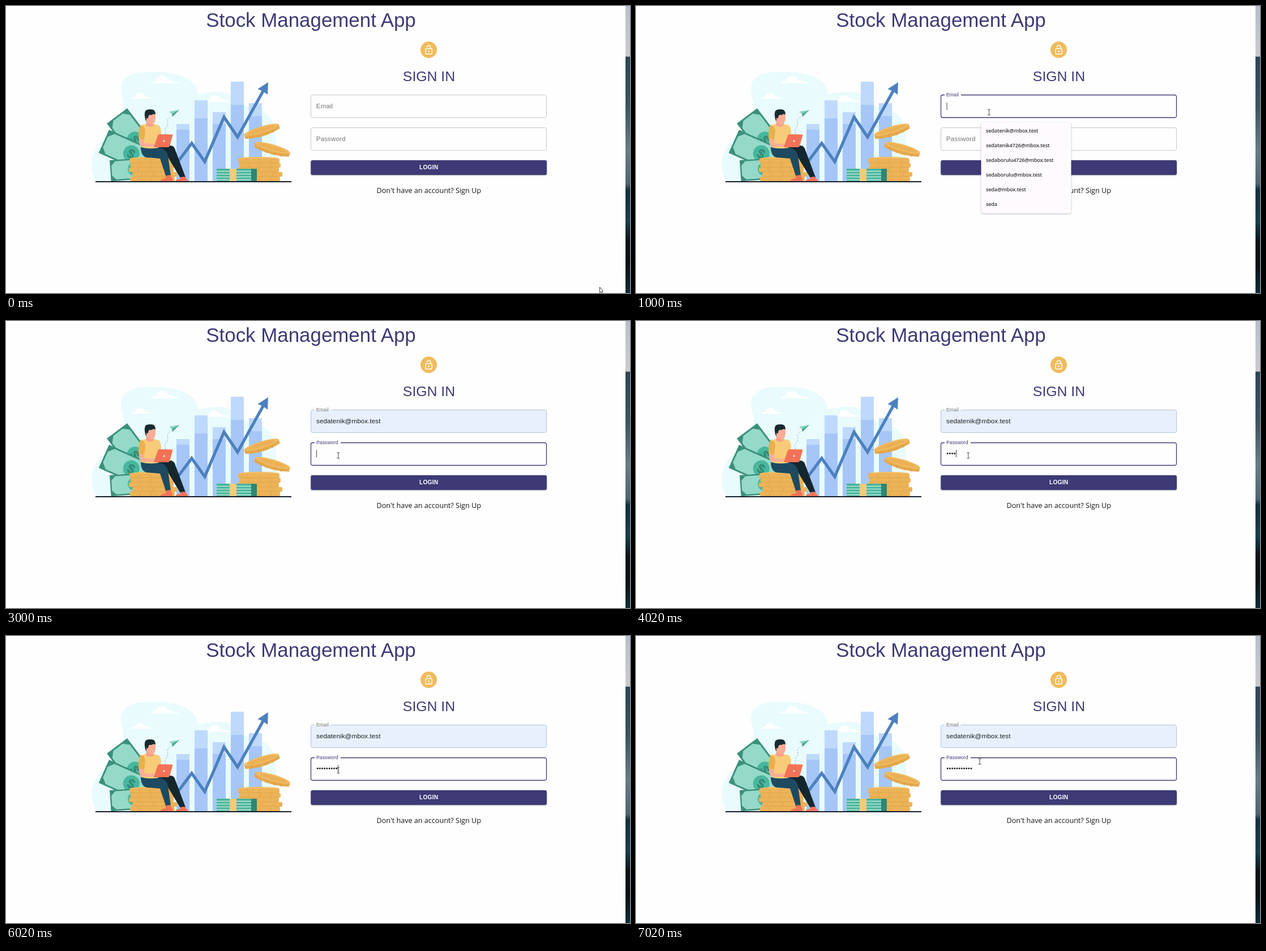
Animation, 1102 px wide and 508 px high, one loop 8000 ms. Source, as an HTML page:

```html
<!DOCTYPE html>
<html lang="en">
<head>
<meta charset="utf-8">
<title>Stock Management App</title>
<style>
html, body { margin: 0; width: 100%; height: 100%; overflow: hidden; background: #fefefe; }
svg { display: block; width: 1102px; height: 508px; font-family: "Liberation Sans", Arial, sans-serif; }
.mid { text-anchor: middle; }
.shade { filter: drop-shadow(0 1px 1px #0005); }
.float { filter: drop-shadow(0 1px 1.5px #0004); }
.value { font-size: 11.6px; letter-spacing: .1px; }
.list { font: 600 9px "Open Sans", sans-serif; letter-spacing: -.1px; fill: #333; }
</style>
</head>
<body>
<svg viewBox="0 0 1102 508">
  <defs>
    <linearGradient id="photo" x2="0" y2="1">
      <stop offset="0" stop-color="#b8bec9"/>
      <stop offset=".175" stop-color="#cbcbcd"/>
      <stop offset=".178" stop-color="#2f4657"/>
      <stop offset=".35" stop-color="#3c5361"/>
      <stop offset=".5" stop-color="#687c88"/>
      <stop offset=".62" stop-color="#4e6573"/>
      <stop offset=".64" stop-color="#13313f"/>
      <stop offset=".75" stop-color="#183f4d"/>
      <stop offset=".82" stop-color="#0a1418"/>
      <stop offset=".9" stop-color="#081115"/>
      <stop offset="1" stop-color="#102d39"/>
    </linearGradient>
    <g id="cloud" fill="#fff"><path d="M0 13q3-5 10-4q1-9 11-9q8 0 10 7q6-1 8 3q8-1 11 3z"/></g>
    <g id="bill">
      <rect width="106" height="45" fill="#3b907a"/>
      <path d="M12 3H94L103 12V33L94 42H12L3 33V12Z" fill="#95d9c8"/>
      <circle cx="53" cy="22.500" r="14.500" fill="#48b79e"/>
      <text class="mid" x="53" y="31" font-size="23" font-weight="700" fill="#318570">$</text>
    </g>
    <g id="coin">
      <path d="M-32-3V4Q0 13 32 4V-3Z" fill="#e5a94c"/>
      <ellipse cy="-3" rx="32" ry="6" fill="#f0ba60"/>
      <ellipse cy="-3" rx="25" ry="3.5" fill="#ebb056"/>
      <path d="M-20 2.500v5M-8 4v5M6 4v5M18 3v5" stroke="#d69a42"/>
    </g>
  </defs>

  <rect x="1094" width="8" height="508" fill="url(#photo)"/>
  <g fill="#3d3a76" class="mid">
    <text x="538.5" y="37" font-size="34.9">Stock Management App</text>
    <text x="747" y="132.5" font-size="24.8">SIGN IN</text>
  </g>
  <circle cx="746.5" cy="77.5" r="14.5" fill="#f1bb5c"/>
  <g fill="none" stroke="#fff" stroke-width="1.5">
    <rect x="741" y="75.5" width="11.2" height="9.4" rx="1"/>
    <path d="M743.4 73.2a3.2 3.2 0 0 1 6.4 0v2.3"/>
    <circle cx="746.6" cy="80.2" r=".8"/>
  </g>

  <path fill="#e9fbfc" d="M160 310C147 290 149 260 167 240C195 222 215 190 205 160C197 130 215 117 250 117C300 115 336 126 339 157C368 149 407 147 413 176C440 178 468 186 474 213C480 250 476 290 484 310Z"/>
  <use href="#cloud" x="255" y="124"/>
  <use href="#cloud" transform="translate(221 154)scale(.76)"/>
  <use href="#cloud" transform="translate(350 158)scale(.9)"/>
  <g id="bars"></g>
  <path d="M301 279L328 243L351 275.500L385 196.500L409 232L456 147" fill="none" stroke="#4c80bf" stroke-width="5.200"/>
  <path d="M463 135L462 157L454 151L444.500 147Z" fill="#4c80bf"/>

  <use href="#bill" transform="translate(214 181)rotate(53)"/>
  <use href="#bill" transform="translate(182 219)rotate(24)"/>
  <use href="#bill" transform="translate(183 273)rotate(-4)scale(.8 .83)"/>

  <g id="stacks"></g>
  <use href="#coin" transform="translate(452 222)rotate(-17)"/>
  <use href="#coin" transform="translate(470 254)rotate(16)"/>
  <g id="cash">
    <path d="M372 288H443V310H372Z" fill="#46b39a"/>
    <path d="M372 292.500H433M372 297.500H433M372 302.500H433M372 307.500H433" stroke="#a5e1d1" stroke-width="1.800"/>
    <path d="M395 288H407V310H395Z" fill="#f6ca7b"/>
    <path d="M433 288H443V310H433Z" fill="#318570"/>
  </g>
  <path d="M158 311H504" stroke="#151c2b" stroke-width="2"/>

  <path d="M282 227Q279 218 284 214Q287 209 285 204Q285 199 292 195" fill="none" stroke="#a5adb0" stroke-dasharray="3 2"/>
  <path d="M288 187L306 184L294 196L293 191Z" fill="#8ad5bf"/>
  <path d="M293 191L306 184L294 196Z" fill="#46a88e"/>

  <g>
    <path d="M263 250L290 247Q297 247 299 255L317 303L309 306L285 266L258 267Z" fill="#14272e"/>
    <path d="M238 250L268 250Q284 253 286 265L291 300L283 303L272 270L247 268Q238 264 238 250Z" fill="#1d4a61"/>
    <path d="M283 300L290 299L294 306V310H272Q274 306 282 305ZM308 303L315 302L321 308V310H299Q301 306 308 306Z" fill="#f37257"/>
    <path d="M237 211Q254 206 270 211Q276 219 273 229L269 251Q252 254 239 250Z" fill="#f8cb78"/>
    <path d="M248 204L260 204L261 211Q255 217 247 211Z" fill="#f4a08a"/>
    <path d="M247 189H264V200Q263 209 257 210Q249 207 247 199Z" fill="#f9ad96"/>
    <path d="M248 205Q244 197 245 190Q245 182 255 183Q264 182 264 192Q260 190 257 193Q251 191 251 199L248 198Z" fill="#172a30"/>
    <path d="M237 211Q246 211 246 222L244 237L234 235Q234 218 237 211Z" fill="#e9b04e"/>
    <path d="M235 234L244 236L244 243L263 244L265 249H240Q234 247 235 234Z" fill="#f9ad96"/>
    <path d="M268 229Q269 227 271 227L294 227.500Q295 228 294 230L289 248Q288 250 286 250H261Z" fill="#f37257"/>
    <circle cx="279" cy="239" r="1.500" fill="#fff"/>
  </g>

  <g id="live"></g>
</svg>
<script>
const NAVY = '#3d3a76';
const get = id => document.getElementById(id);
const rect = (x, y, w, h, fill, more = '') =>
  `<rect x="${x}" y="${y}" width="${w}" height="${h}" fill="${fill}" ${more}/>`;
const text = (x, y, s, more = '') => `<text x="${x}" y="${y}" ${more}>${s}</text>`;

// x, top, where the darker part begins
get('bars').innerHTML = [[301, 209, 219], [333, 167, 199], [365, 188, 209], [397, 134, 175], [429, 172, 195]]
  .map(([x, top, dark]) => rect(x, top, 23, 310 - top, '#bed9fb') + rect(x, dark, 23, 310 - dark, '#a5c6f7')).join('');

function stack(x, w) {
  let out = `<ellipse cx="${x + w / 2}" cy="270" rx="${w / 2 - 1}" ry="3" fill="#f2bd62"/>`;
  for (let i = 0; i < 5; i++) {
    const left = x + [0, 2, -1, 5, 1][i], y = 270 + i * 8;
    out += rect(left, y, w, 8, '#edb358', 'rx="2"');
    out += `<path d="M${left + 1} ${y + 7.5}h${w - 2}M${left + 17} ${y + 1}v6m20-6v6m20-6v6" stroke="#dfa549" fill="none"/>`;
  }
  return out;
}
get('stacks').innerHTML = stack(218, 79) + stack(410, 73);

const EMAIL = 'sedatenik@mbox.test';
const HINTS = [EMAIL, 'sedatenik4726@mbox.test', 'sedaborulu4726@mbox.test',
  'sedaborulu@mbox.test', 'seda@mbox.test', 'seda'];

function field(y, label, notchEnd, { focus, hover, floated = focus, fill = 'none', edge = '#c6c6c6' }) {
  const stroke = focus ? NAVY : hover ? '#333' : edge;
  const box = `<path d="M${floated ? notchEnd : 545} ${y + .5}H951.5a3 3 0 0 1 3 3v34a3 3 0 0 1-3 3H541.5a3 3 0 0 1-3-3v-34a3 3 0 0 1 3-3H545"
    fill="${fill}" stroke="${stroke}" stroke-width="${focus ? 1.3 : 1}"/>`;
  return box + (floated
    ? text(548, y + 3.2, label, `font-size="8.64" letter-spacing=".08" fill="${focus ? NAVY : '#777'}"`)
    : text(547.8, y + 24, label, 'class="value" fill="#757575"'));
}

const caret = (x, y) => `<path d="M${x} ${y}v13" stroke="#444"/>`;
const beam = (x, y) => `<path d="M${x - 2.5} ${y - 5}h2l.5.5l.5-.5h2M${x} ${y - 5}v10M${x - 2.5} ${y + 5}h2l.5-.5l.5.5h2" fill="none" stroke="#333" stroke-width=".9"/>`;
const arrow = '<path d="M1048.500 497.500V507.500L1050.700 505.500L1052 509L1053.500 508.300L1052.200 505H1054.500Z" fill="#fff" stroke="#333" stroke-width=".9"/>';

function dots(n) {
  let out = '';
  for (let i = 0; i < n; i++) out += `<circle cx="${550.2 + i * 4.18}" cy="234.5" r="1.45" fill="#1d1d1d"/>`;
  return out;
}

const popup = () => rect(609.5, 205.5, 159, 161.5, '#fefafe', 'rx="4" class="float"') +
  HINTS.map((s, i) => text(618, 224 + 26 * i, s, 'class="list"')).join('');

const typed = { floated: true, fill: '#e8f0fe' };
const steps = [
  { at: 0, mouse: arrow },
  { at: 1000, email: { focus: true }, caret: [549, 171], popup: true, mouse: beam(623.5, 188) },
  { at: 2000, email: { ...typed, focus: true }, password: { hover: true }, caret: [663.5, 171] },
  { at: 3000, caret: [548.5, 228] },
  { at: 4020, dots: 4, caret: [565.5, 228] },
  { at: 5020, dots: 5 },
  { at: 6020, dots: 9, caret: [586.5, 228] },
  { at: 7020, dots: 11, mouse: beam(607, 222) }
].map(s => s.at < 2000 ? s : { value: EMAIL, mouse: beam(586.8, 238), ...s })
 .map(s => s.at < 3000 ? s : { email: { ...typed, edge: '#b5c1d5' }, password: { focus: true }, ...s });

function draw(s) {
  get('live').innerHTML =
    field(157, 'Email', 574, s.email || {}) +
    field(215, 'Password', 591, s.password || {}) +
    text(548, 181.2, s.value || '', 'class="value" fill="#1c1c1c"') +
    dots(s.dots || 0) +
    rect(538.3, 273, 416.7, 26, NAVY, 'rx="3" class="shade"') +
    text(746.7, 289.4, 'LOGIN', 'class="mid" font-size="10.2" font-weight="700" letter-spacing=".2" fill="#fff"') +
    text(746.7, 331, "Don't have an account? Sign Up", 'class="mid" font-size="12.6" font-family="Open Sans, sans-serif" fill="#151515"') +
    (s.caret ? caret(...s.caret) : '') +
    (s.popup ? popup() : '') + s.mouse;
}

let shown;
const start = performance.now();
function tick() {
  const t = (performance.now() - start) % 8000;
  const now = steps.findLast(s => s.at <= t);
  if (now !== shown) draw(shown = now);
  requestAnimationFrame(tick);
}
tick();
</script>
</body>
</html>
```
